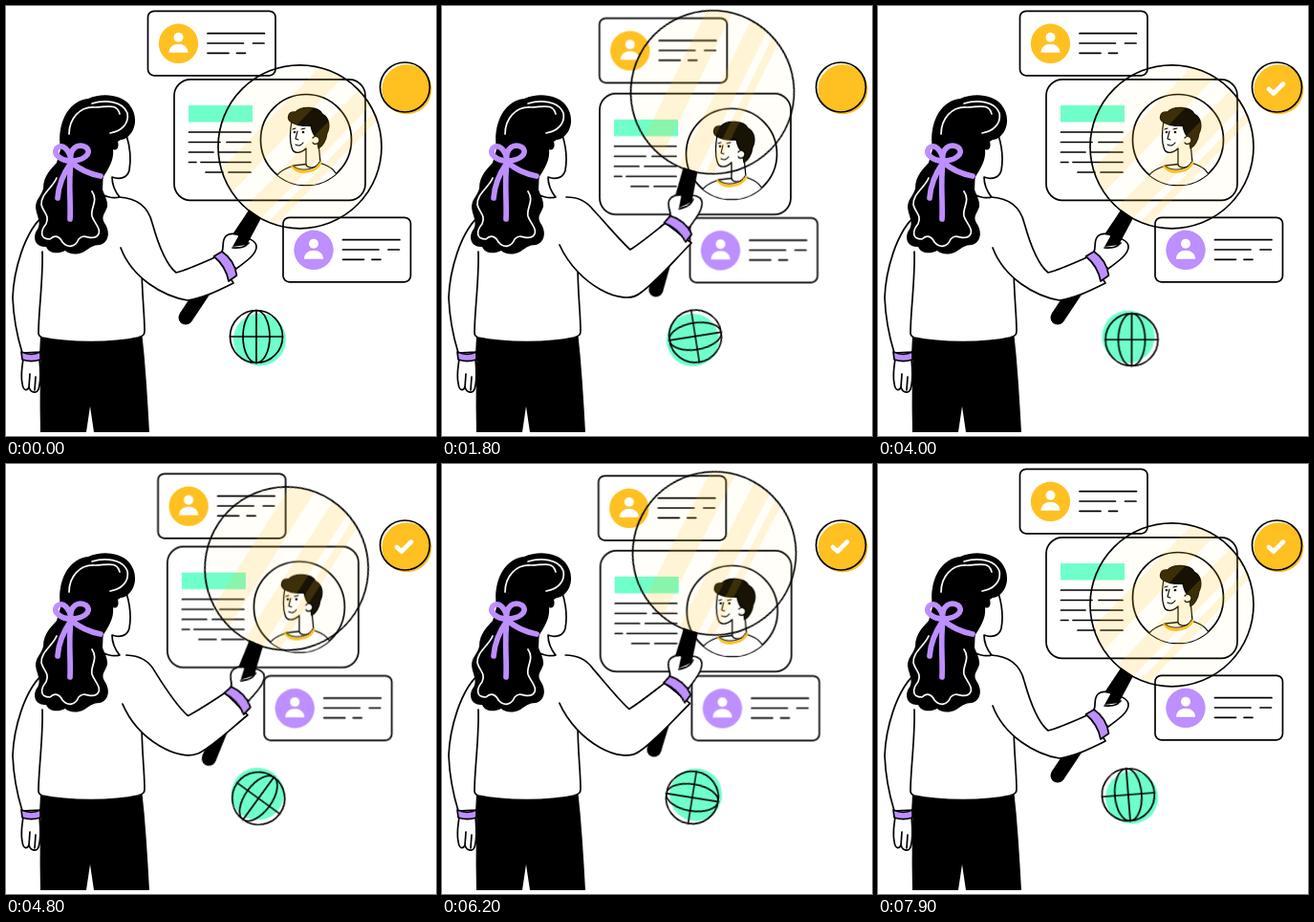
An HTML page that plays this animation: 450x450 px, repeating every 8 s.

```html
<!DOCTYPE html>
<html lang="en">
<head>
<meta charset="utf-8">
<title>Profile search</title>
<style>
html, body { margin: 0; width: 100%; height: 100%; overflow: hidden; background: #fff; }
svg { display: block; width: 100%; height: 100%; }
.ink { fill: none; stroke: #000; stroke-width: 1.7; stroke-linecap: round; stroke-linejoin: round; }
.paper { fill: #fff; }
.slide, .swing, .sleeve { animation: 4s cubic-bezier(.33, 0, .67, 1) infinite; }
.slide { animation-name: slide; }
.swing { animation-name: swing; transform-origin: 113px 197px; }
.sleeve { animation-name: bend; }
.globe { animation: spin 8s linear infinite; transform-origin: 263.75px 347.6px; }
.check { stroke-dasharray: 30; animation: check 8s linear infinite; }

@keyframes slide {
  0%, 83.33%, 100% { transform: translate(0, 0); }
  33.33%, 50% { transform: translate(var(--x), var(--y)); }
}
@keyframes swing {
  0%, 83.33%, 100% { transform: rotate(0deg); }
  33.33%, 50% { transform: rotate(-17.8deg); }
}
@keyframes bend {
  0%, 83.33%, 100% { d: path("M118 200 C138 201 149 211 153 227 C160 252 168 271 178 279 C190 276 205 269 221 262 L238 290 C220 299 205 306 190 308 C165 304 132 285 120 253"); }
  33.33%, 50% { d: path("M130 200 C143 200 151 204 158 213 C172 228 186 245 197 255 C208 248 220 238 234 227 L261 248 C245 264 225 288 208 300 C190 316 142 292 123 250"); }
}
@keyframes spin { to { transform: rotate(360deg); } }
@keyframes check {
  0%, 37.5% { stroke-dashoffset: 30; opacity: 0; }
  37.6% { stroke-dashoffset: 30; opacity: 1; }
  42%, 100% { stroke-dashoffset: 0; opacity: 1; }
}
</style>
</head>
<body>
<svg viewBox="0 0 450 450">
  <defs>
    <clipPath id="lens"><circle cx="307.5" cy="147.3" r="85.5"/></clipPath>
    <clipPath id="portrait"><circle cx="314" cy="140" r="47.5"/></clipPath>
    <g id="card">
      <rect class="ink" width="133.5" height="67.5" rx="6.5"/>
      <circle cx="32" cy="34" r="20.7"/>
      <circle cx="32" cy="27.5" r="5" fill="#fff"/>
      <path d="M22 43.5C22 31.5 42 31.5 42 43.5Z" fill="#fff"/>
      <path class="ink" d="M62.5 23.4H122M62.5 33.7H100M110 33.7H121.5M62.5 44H84.5M93 44H102"/>
    </g>
  </defs>

  <!-- cards -->
  <g class="slide" style="--x:16.3px;--y:7.5px"><use href="#card" x="148.5" y="5.3" fill="#ffc021"/></g>
  <g class="slide" style="--x:-30.5px;--y:.5px"><use href="#card" x="290" y="221.3" fill="#bd8fff"/></g>
  <g class="slide" style="--x:-11px;--y:14.7px">
    <rect class="ink" x="176" y="76.8" width="200" height="126.5" rx="17"/>
    <rect x="191" y="104" width="67" height="17.5" fill="#6fffcb"/>
    <path class="ink" d="M191.5 132H256M191.5 142.5H224M231 142.5H256M191.5 153H217M223 153H256M191.5 163.5H199M204 163.5H256M209 174H227M233 174H256"/>
    <circle class="ink paper" cx="314" cy="140" r="47.5"/>
    <g clip-path="url(#portrait)" fill="none" stroke="#000" stroke-width="1.3" stroke-linecap="round" stroke-linejoin="round">
      <path class="paper" d="M280 187C281 176 289 171 301 167L328 164C340 168 347 172 349 187"/>
      <path class="paper" d="M299 120C297 132 297 142 299 148C301 156 309 154 314 149L314 163C312 171 325 171 329 164L327 143L327 122Z"/>
      <path d="M300 168C307 177 325 174 329 164" stroke="#ffc021" stroke-width="3"/>
      <path d="M300 167C307 174 324 172 328 163" stroke-width="1"/>
      <path d="M299 122C293 118 295 110 303 111C309 104 327 105 331 113C339 117 339 127 336 133C335 141 331 147 327 149L325 137C321 135 320 130 319 125C313 126 305 125 299 122Z" fill="#120e04"/>
      <path class="paper" d="M321 138C325 134 330 139 327 143C325 145 322 145 321 143"/>
      <path d="M300 129L303 128M309 129L313 128M305 131L303 139L306 140M303 145C306 147 309 146 311 143" stroke-width="1.1"/>
      <circle cx="302" cy="132" r=".7" fill="#000"/><circle cx="311" cy="132" r=".7" fill="#000"/>
    </g>
  </g>

  <!-- coin -->
  <circle cx="419.5" cy="87.3" r="26" fill="#ffc021"/>
  <circle class="ink" cx="417.5" cy="85" r="26"/>
  <path class="check" d="M409 87L414 91.5L424 81.5" fill="none" stroke="#fff" stroke-width="4.6" stroke-linecap="round" stroke-linejoin="round"/>

  <!-- globe -->
  <g class="globe">
    <circle cx="265.5" cy="349.2" r="27.5" fill="#6fffcb"/>
    <g class="ink">
      <circle cx="262" cy="346" r="27.5"/>
      <ellipse cx="262" cy="346" rx="14" ry="27.5"/>
      <path d="M262 318.5V373.5M234.5 346H289.5"/>
    </g>
  </g>

  <!-- magnifier -->
  <g class="swing">
    <path d="M260.5 217.5L188 326" stroke="#000" stroke-width="15"/>
    <circle cx="188" cy="326" r="7.5"/>
    <g clip-path="url(#lens)" fill="#ffc021">
      <circle cx="307.5" cy="147.3" r="86" opacity=".025"/>
      <path transform="translate(307.5 147.3) rotate(44)" opacity=".16" d="M-43-90H-18V90H-43ZM3-90H23V90H3ZM31-90H39V90H31Z"/>
    </g>
    <circle class="ink" cx="307.5" cy="147.3" r="85.5"/>
  </g>

  <!-- body -->
  <path d="M37 340H142C146 375 148 410 150 446H92L88 419L84 446H36C35 410 36 375 37 340Z"/>
  <g class="ink">
    <path class="paper" d="M18 369C17 378 15 386 17 395C18 403 22 403 24 399C26 405 32 406 34 401C37 392 36 380 35 369Z"/>
    <path d="M24 399L25 385M30 402L31 388"/>
    <path class="paper" d="M42 217C18 235 8 280 7 305C8 330 13 350 17 363L36 362L42 250Z"/>
    <path d="M16 362C23 365 30 365 36 362L36 370C30 372 23 372 17 370Z" fill="#bd8fff"/>
    <path class="paper" stroke="none" d="M42 217L105 196L130 201L142 270L144 343L34 345Z"/>
    <path class="paper" d="M38 257C39 285 34 320 34 342C34 345 35 346 38 347C66 353 112 353 138 347C144 345 145 344 145 340C145 322 142 300 142 270"/>
    <path class="paper" d="M102 150L100 197C106 200 112 202 119 200C114 194 111 187 111 179C119 182 127 180 129 172C131 161 130 148 126 135Z"/>
  </g>

  <!-- hair -->
  <path d="M57 150C53 125 64 99 86 97C101 90 121 93 129 103C138 114 137 130 126 138C121 141 119 139 117 142C119 149 115 152 112 150C113 160 109 167 105 174C102 178 101 181 100 184C99 194 107 200 106 210C104 217 99 220 103 227C110 237 107 248 98 250C91 250 88 253 82 257C74 261 66 260 62 256C54 260 45 259 42 252C32 253 27 244 32 235C38 227 32 220 31 211C31 202 37 199 39 191C39 177 48 170 53 164Z"/>
  <g class="ink" style="stroke:#fff">
    <path d="M66 134C66 118 77 105 93 106C105 106 116 101 119 113M90 102C103 98 122 99 127 112C129 123 121 131 109 133"/>
    <path d="M53 180C49 190 36 197 37 208C39 216 46 219 42 228C36 235 35 244 46 244C51 239 56 241 59 247C65 254 73 252 76 244C82 237 88 246 95 241C102 235 92 227 90 220C88 211 97 204 90 194"/>
  </g>
  <g fill="none" stroke="#bd8fff" stroke-width="5.7" stroke-linecap="round" stroke-linejoin="round">
    <path d="M68 162C57 162 49 155 53 149C59 143 67 151 68 162C66 149 75 143 84 148C91 155 80 162 68 162"/>
    <path d="M68 164C61 174 55 186 54 201M68 164C65 184 68 204 67 223M69 164C78 172 89 176 99 178"/>
  </g>

  <!-- arm -->
  <path class="sleeve ink paper" d="M118 200 C138 201 149 211 153 227 C160 252 168 271 178 279 C190 276 205 269 221 262 L238 290 C220 299 205 306 190 308 C165 304 132 285 120 253"/>
  <g class="swing">
    <path class="ink paper" d="M225 260C229 253 225 246 230 241C234 237 241 238 246 241C255 243 263 246 262 253C261 261 250 268 241 275Z"/>
    <path d="M260.5 217.5L267 222L252 250L237 252L247 234L254 213Z"/>
    <path class="ink" d="M237 253C243 253 249 254 254 248"/>
    <path class="ink" d="M217.500 262L226 257C235 263 240 272 241.500 282L233 288C231 277 226 269 217.500 262Z" style="fill:#bd8fff"/>
  </g>
</svg>
</body>
</html>
```
